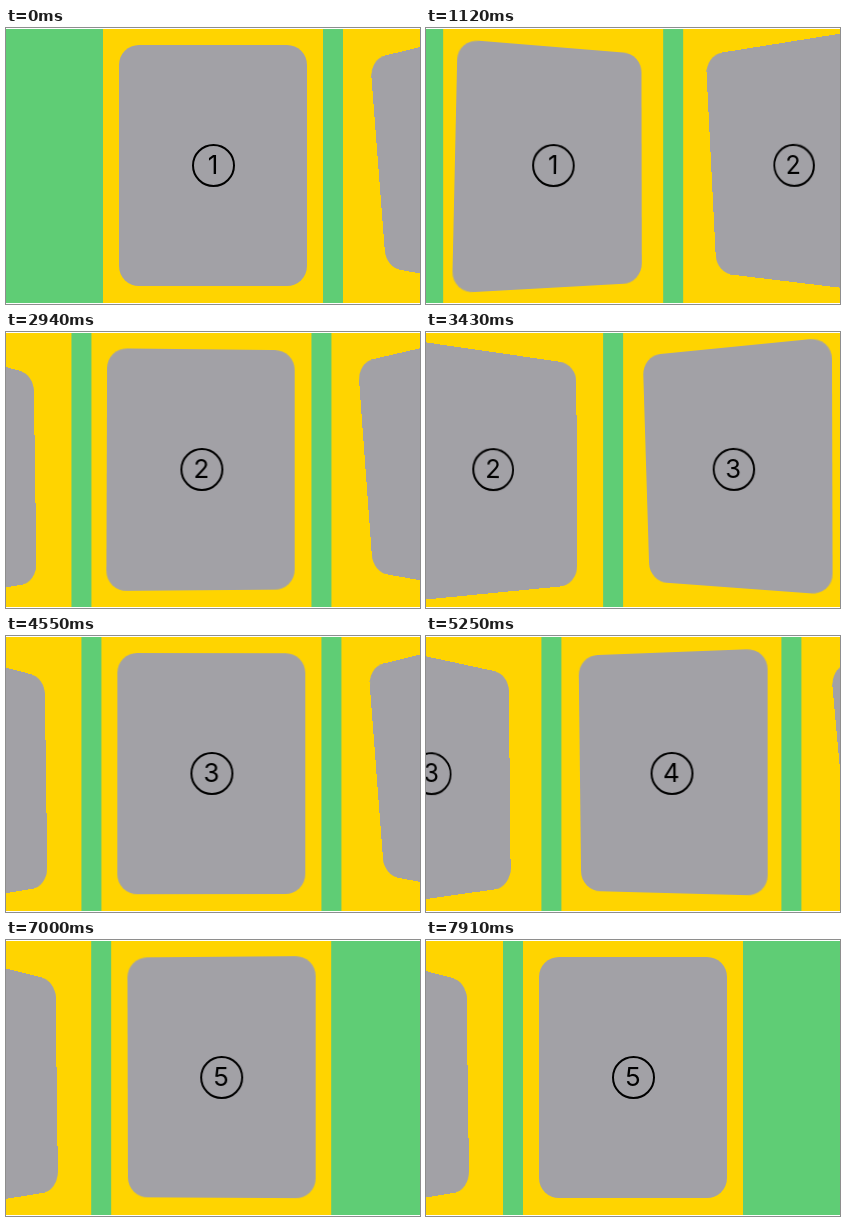
Animation of 414 by 276 pixels, one loop 8000 ms. Source, as an HTML page:

```html
<!DOCTYPE html>
<html lang="en">
<head>
<meta charset="utf-8">
<title>Tilting card carousel</title>
<style>
  @property --scroll {
    syntax: "<number>";
    inherits: true;
    initial-value: 0;
  }

  html, body {
    margin: 0;
    width: 100%;
    height: 100%;
    overflow: hidden;
    background: #fff;
  }

  .stage {
    position: absolute;
    left: 0;
    top: 1px;
    width: 414px;
    height: 273.5px;
    overflow: hidden;
    background: #5fcd75;
    animation: swipe 8s linear infinite;
  }

  .card {
    --offset: calc(var(--index) * 240 - var(--scroll));
    position: absolute;
    left: 97px;
    top: 0;
    width: 220px;
    height: 100%;
    background: #ffd400;
    transform: translateX(calc(var(--offset) * 1px));
  }

  /* The panel tilts in proportion to its card's distance from the centre. */
  .panel {
    position: absolute;
    left: 16px;
    top: 16px;
    width: 188px;
    height: 241px;
    border-radius: 20px;
    background: #a2a1a6;
    display: flex;
    align-items: center;
    justify-content: center;
    transform: perspective(241px) rotate3d(.22, 1, .085, calc(var(--offset) * -.1deg));
  }

  .number {
    box-sizing: border-box;
    width: 43px;
    height: 43px;
    border: 2.6px solid #000;
    border-radius: 50%;
    font: 400 26px/38px Inter, Roboto, sans-serif;
    text-align: center;
    color: #000;
  }

  @keyframes swipe {
    0% { --scroll: 0; }
    7.875% { --scroll: 0; animation-timing-function: cubic-bezier(.4, 0, .37, 1); }
    26.25% { --scroll: 240; }
    32.375% { --scroll: 240; animation-timing-function: cubic-bezier(.8, 0, .48, 1); }
    49% { --scroll: 480; }
    56% { --scroll: 480; animation-timing-function: cubic-bezier(.4, 0, .25, 1); }
    72.625% { --scroll: 720; }
    76.125% { --scroll: 720; animation-timing-function: cubic-bezier(.4, 0, .37, 1); }
    90.125%, 100% { --scroll: 960; }
  }
</style>
</head>
<body>
<div class="stage">
  <div class="card" style="--index: 0"><div class="panel"><div class="number">1</div></div></div>
  <div class="card" style="--index: 1"><div class="panel"><div class="number">2</div></div></div>
  <div class="card" style="--index: 2"><div class="panel"><div class="number">3</div></div></div>
  <div class="card" style="--index: 3"><div class="panel"><div class="number">4</div></div></div>
  <div class="card" style="--index: 4"><div class="panel"><div class="number">5</div></div></div>
</div>
</body>
</html>
```
